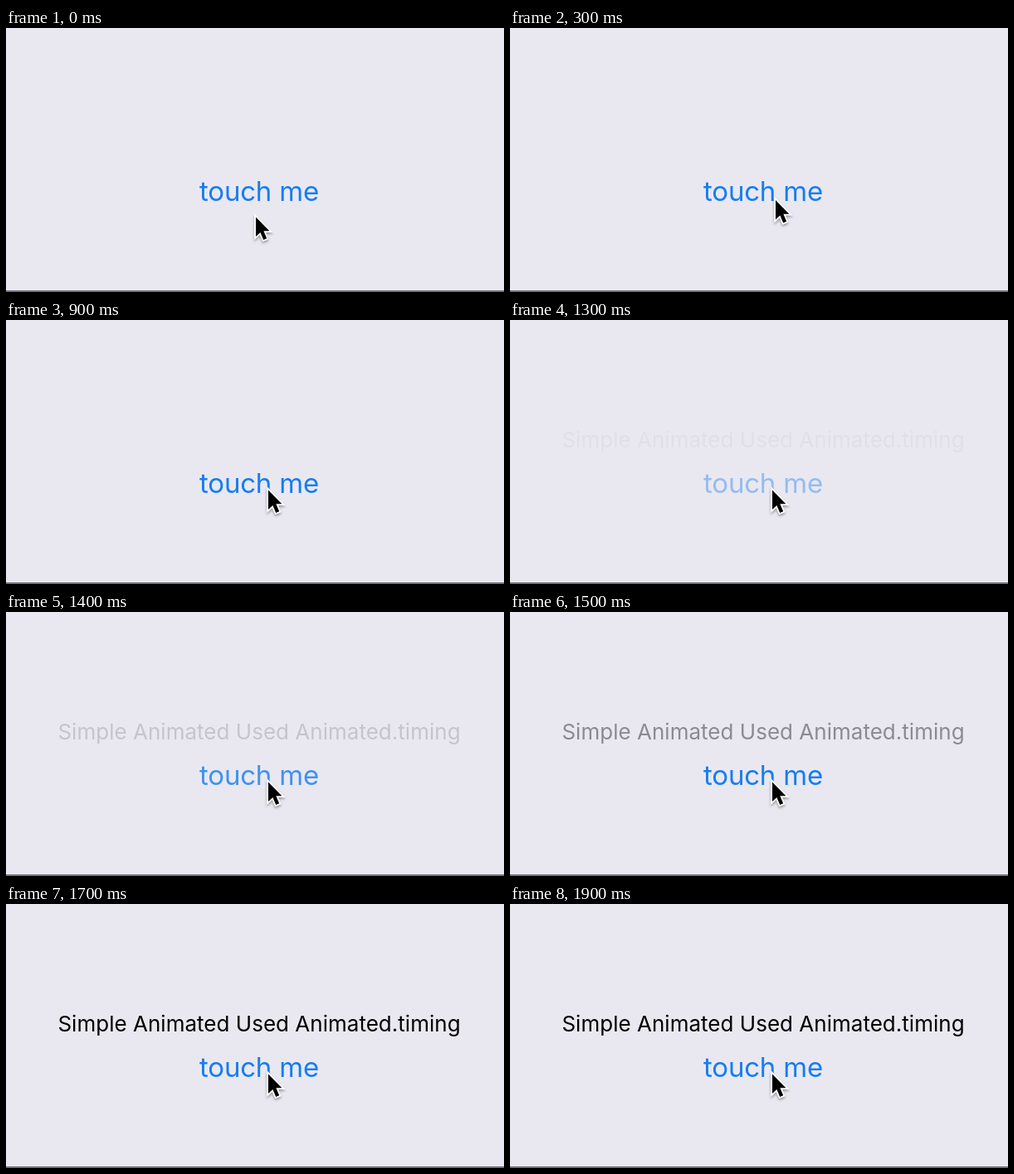
Animation, 600 px wide and 319 px high, one loop 2.1 s. Source, as an HTML page:

```html
<!DOCTYPE html>
<html lang="en">
<head>
<meta charset="utf-8">
<style>
  html, body { margin: 0; width: 100%; height: 100%; overflow: hidden; background: #e9e8f1; }
  svg { display: block; width: 600px; height: 319px; }
  text { font-family: Inter, "Open Sans", sans-serif; text-anchor: middle; }
  #title { font-size: 26px; letter-spacing: 0.02px; }
  #button { font-size: 33px; letter-spacing: -0.22px; fill: #167df0; }
  #cursor { stroke: #fff; stroke-width: 3.6; paint-order: stroke; filter: drop-shadow(0 2px 1.5px rgba(0, 0, 0, .35)); }
</style>
</head>
<body>
<svg viewBox="0 0 600 319">
  <rect y="317" width="600" height="2" fill="#73727b"/>
  <text id="title" x="305" y="154">Simple Animated Used Animated.timing</text>
  <text id="button" x="305" y="209">touch me</text>
  <path id="cursor" d="M0 0V23.5L5.4 18.4L9.2 27.5L13.2 25.8L9.4 16.8H16.4Z"/>
</svg>
<script>
  const LOOP = 2100;
  const title = document.getElementById("title");
  const button = document.getElementById("button");
  const cursor = document.getElementById("cursor");

  // Each track holds [start time, value] pairs; values change in hard steps.
  const cursorTrack = [[0, "301,228.5"], [200, "310,218"], [300, "320,208"], [600, "318,206.5"], [700, "316,205.5"]];
  const titleTrack = [[0, 0], [1300, 0.03], [1400, 0.15], [1500, 0.4], [1600, 0.75], [1700, 1]];
  const buttonTrack = [[0, 1], [1300, 0.4], [1400, 0.8], [1500, 1]];

  const valueAt = (track, time) => track.findLast(([start]) => start <= time)[1];

  function draw(now) {
    const time = now % LOOP;
    cursor.setAttribute("transform", `translate(${valueAt(cursorTrack, time)})`);
    title.setAttribute("opacity", valueAt(titleTrack, time));
    button.setAttribute("opacity", valueAt(buttonTrack, time));
    requestAnimationFrame(draw);
  }
  draw(0);
</script>
</body>
</html>
```
